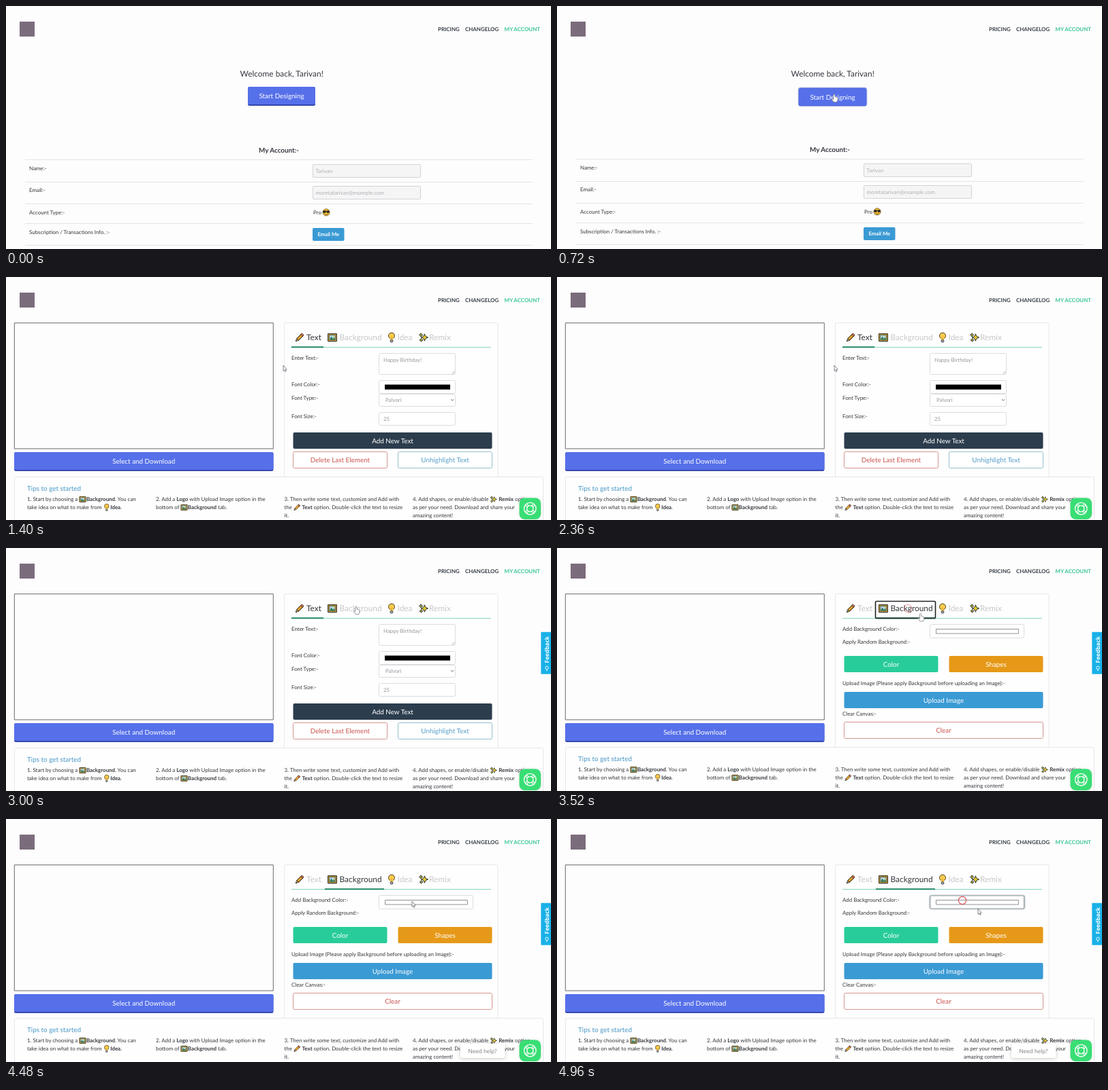
Write an HTML page with a canvas that moves like this. It is 800 by 358 pixels and loops after 5 s.

```html
<!DOCTYPE html>
<html lang="en">
<head>
<meta charset="utf-8">
<title>Design tool walkthrough</title>
<style>
html, body { margin: 0; width: 100%; height: 100%; overflow: hidden; background: #fefdfe; }
canvas { display: block; width: 800px; height: 358px; }
</style>
</head>
<body>
<canvas id="stage" width="800" height="358"></canvas>
<script>
const ctx = document.getElementById('stage').getContext('2d');
const LOOP = 5000, TAU = Math.PI * 2;
const PAGE_OPEN = 880, HELP_ICON = 1040, TAB_SWITCH = 3240, TAB_BLUR = 4240, HELP_TIP = 4200, COLOR_FOCUS = 4800;
const SMALL = 7.92, MEDIUM = 9.9, LARGE = 11.9;
const INK = '#34383d', FAINT = '#c8c8cb', MUTED = '#94999e', BLUE = '#3a9ad4';
const RED = '#c9534e', RED_EDGE = '#d39690';

// Fractional glyph advances keep small text at its true width.
ctx.textRendering = 'geometricPrecision';

const clamp = v => Math.max(0, Math.min(1, v));
const ease = v => { v = clamp(v); return v * v * (3 - 2 * v); };

function box(x, y, w, h, r, fill, stroke, line = 1) {
  ctx.beginPath();
  ctx.roundRect(x, y, w, h, r);
  if (fill) { ctx.fillStyle = fill; ctx.fill(); }
  if (stroke) { ctx.strokeStyle = stroke; ctx.lineWidth = line; ctx.stroke(); }
}

function text(str, x, y, size = SMALL, color = INK, align = 'left', weight = 400, family = 'Lato') {
  ctx.font = `${weight} ${size}px ${family}, sans-serif`;
  ctx.textAlign = align;
  ctx.fillStyle = color;
  ctx.fillText(str, x, y);
}

function shape(points, fill, stroke, line = 1) {
  ctx.beginPath();
  points.forEach(([x, y]) => ctx.lineTo(x, y));
  ctx.closePath();
  if (fill) { ctx.fillStyle = fill; ctx.fill(); }
  if (stroke) { ctx.strokeStyle = stroke; ctx.lineWidth = line; ctx.stroke(); }
}

function disc(x, y, r, fill, stroke, line = 1) {
  box(x - r, y - r, r * 2, r * 2, r, fill, stroke, line);
}

function rule(x1, y1, x2, y2, color, line = 1) {
  ctx.beginPath();
  ctx.moveTo(x1, y1);
  ctx.lineTo(x2, y2);
  ctx.strokeStyle = color;
  ctx.lineWidth = line;
  ctx.stroke();
}

function star(x, y, r) {
  const points = Array.from({ length: 8 }, (_, i) => {
    const d = i % 2 ? r * 0.42 : r, a = i * Math.PI / 4;
    return [x + d * Math.sin(a), y - d * Math.cos(a)];
  });
  shape(points, '#ecc52f', '#25352a', 1);
}

// Icons are drawn in a 14 unit square around the origin.
const icons = {
  pencil() {
    ctx.rotate(-Math.PI / 4);
    box(-4.5, -1.9, 11, 3.8, 0.8, '#f5aa2c', '#33291d', 1);
    box(4.2, -1.9, 2.8, 3.8, 1, '#dd7a62', '#33291d', 0.8);
    shape([[-4.5, -1.9], [-8.3, 0], [-4.5, 1.9]], '#f4d4a0', '#33291d', 0.9);
    shape([[-6.6, -0.8], [-8.5, 0], [-6.6, 0.8]], '#222');
  },
  picture() {
    box(-6.4, -5.4, 12.8, 11, 0.5, '#d9ad48', '#3d3826', 1.2);
    box(-4.4, -3.5, 8.8, 7.2, 0, '#a9d6e6', '#4e4a32', 0.8);
    shape([[-4.2, 3.5], [-1.6, -1.2], [1, 2], [2.7, 0], [4.2, 3.5]], '#39784c');
    disc(2.4, -1.7, 1.1, '#f2ce45');
  },
  bulb() {
    disc(0, -2.4, 4.5, '#fbcb4d', '#4b3a1b', 1);
    shape([[-2.6, 1], [-1.8, 4], [1.8, 4], [2.6, 1]], '#fbcb4d');
    box(-1.8, 3.6, 3.6, 3.4, 1, '#a5a8ad', '#3b3b3d', 0.9);
    rule(0, -1, 0, 3, '#c98e26', 0.8);
  },
  sparkles() {
    star(1.4, 0, 5.2);
    star(-3.9, -3.6, 2.7);
    star(-3.5, 3.9, 2.5);
  },
  cool() {
    disc(0, 0, 6.5, '#f7c437', '#5c4519', 0.9);
    box(-6, -3, 5.4, 4, 1.5, '#202024');
    box(0.6, -3, 5.4, 4, 1.5, '#202024');
    rule(-5, -2.6, 5, -2.6, '#202024', 1);
    ctx.beginPath();
    ctx.arc(0, 1.4, 3, 0.3, Math.PI - 0.3);
    ctx.strokeStyle = '#5c3a16';
    ctx.stroke();
  }
};

function icon(name, x, y, size) {
  ctx.save();
  ctx.translate(x, y);
  ctx.scale(size / 14, size / 14);
  icons[name]();
  ctx.restore();
}

// Inline markup: *bold* and {icon}.
function rich(line, x, y) {
  let weight = 400;
  for (const part of line.split(/(\*|\{\w+\})/)) {
    if (part === '*') weight = weight === 400 ? 700 : 400;
    else if (part[0] === '{') {
      icon(part.slice(1, -1), x + 5.2, y - 2.8, 10.2);
      x += 10.6;
    } else if (part) {
      text(part, x, y, SMALL, INK, 'left', weight);
      x += ctx.measureText(part).width;
    }
  }
}

function button(label, x, y, w, h, fill, size = MEDIUM) {
  box(x, y, w, h, 2, fill);
  text(label, x + w / 2, y + h / 2 + size * 0.36, size, '#fff', 'center');
}

function outlineButton(label, x, y, w, h, color, border) {
  box(x + 0.5, y + 0.5, w - 1, h - 1, 2, '#fff', border);
  text(label, x + w / 2, y + h / 2 + 3.6, MEDIUM, color, 'center');
}

function raisedButton(label, x, y, w, h) {
  box(x, y, w, h, 2.5, '#3548ae');
  box(x, y, w, h - 2, 2.5, '#5670ea');
  text(label, x + w / 2, y + h / 2 + 3, MEDIUM, '#fff', 'center');
}

function field(x, y, w, h, value, fill = '#fff') {
  box(x + 0.5, y + 0.5, w - 1, h - 1, 2, fill, '#dcdcdf');
  if (value) text(value, x + 7, y + 13, SMALL, MUTED);
}

function header() {
  box(20, 23, 22, 22, 0, '#7b6c7c');
  text('PRICING', 634, 36.8, SMALL, '#343d45', 'left', 700);
  text('CHANGELOG', 674, 36.8, SMALL, '#343d45', 'left', 700);
  text('MY ACCOUNT', 784, 36.8, SMALL, '#36c596', 'right', 700);
}

function accountPage(pressed) {
  text('Welcome back, Tarivan!', 404.7, 104, LARGE, INK, 'center');
  if (pressed) {
    box(353.5, 119.5, 102, 28.5, 3.5, '#c6cdf0');
    box(355, 121, 99, 26, 2.5, '#5670ea', '#4a5fd0', 0.8);
    text('Start Designing', 404.5, 137.5, MEDIUM, '#fff', 'center');
  } else raisedButton('Start Designing', 355, 119, 99, 28);

  const up = pressed ? 1 : 0;
  ctx.save();
  ctx.translate(0, -up);
  text('My Account:-', 400.5, 215.5 + up * 0.5, MEDIUM, INK, 'center', 700);
  for (const y of [226, 259, 291, 320, 352]) rule(28, y + 0.5, 773, y + 0.5, '#e3e3e6');
  text('Name:-', 34, 241.5);
  text('Email:-', 34, 274.2);
  text('Account Type:-', 34, 306.5);
  text('Subscription / Transactions Info. :-', 34, 335.5);
  [['Tarivan', 233], ['moretatarivan@example.com', 265]].forEach(([value, y]) => {
    box(450.5, y + 0.5, 158, 19, 1.5, '#f6f5f6', '#d3d3d6');
    text(value, 454.5, y + 12.7, SMALL, '#b0b1b7');
  });
  text('Pro', 451, 306.5);
  icon('cool', 470, 304, 11);
  box(450, 327, 46.5, 19, 2, BLUE);
  text('Email Me', 473.3, 339.2, 7.7, '#fff', 'center', 700);
  ctx.restore();
}

function tabs(second, focused) {
  rule(419, 103.7, 712, 103.7, '#80cfb7');
  icon('pencil', 431, 89, 13.5);
  icon('picture', 479, 89, 14);
  icon('bulb', 566, 89, 14);
  icon('sparkles', 613, 89, 14);
  text('Text', 441, 93.2, LARGE, second ? FAINT : INK);
  text('Background', 489.5, 93.2, LARGE, second ? INK : FAINT);
  text('Idea', 574.5, 93.2, LARGE, FAINT);
  text('Remix', 621, 93.2, LARGE, FAINT);
  const [x, w] = second ? [468, 87] : [419, 47];
  box(x, 102.3, w, 1.9, 0, '#26886b');
  if (focused) box(467.5, 78.5, 88, 25, 1.5, null, '#202326', 1.6);
}

function textPanel() {
  text('Enter Text:-', 419, 121.5);
  field(547, 112, 113, 32, 'Happy Birthday!');
  rule(654.5, 142.5, 658.5, 138.5, '#99999c', 0.7);
  rule(656.5, 142.5, 658.5, 140.5, '#99999c', 0.7);
  text('Font Color:-', 419, 161);
  field(547, 152, 113, 20);
  box(556, 158.5, 96, 7.2, 0, '#000');
  text('Font Type:-', 419, 180.5);
  field(547, 172, 113, 19);
  text('Palvori', 557, 184.3, SMALL, MUTED);
  ctx.beginPath();
  ctx.moveTo(653, 180);
  ctx.lineTo(655.2, 182.3);
  ctx.lineTo(657.4, 180);
  ctx.strokeStyle = '#77787b';
  ctx.lineWidth = 1;
  ctx.stroke();
  text('Font Size:-', 419, 208);
  field(547, 199, 113, 20, '25');
  button('Add New Text', 421.5, 229, 292, 24, '#2c3d4e');
  outlineButton('Delete Last Element', 421, 257, 139, 25, RED, RED_EDGE);
  outlineButton('Unhighlight Text', 575, 257, 139, 25, '#559dc8', '#92c0cd');
}

function backgroundPanel(focused) {
  text('Add Background Color:-', 419, 121.5);
  if (focused) box(547.5, 113, 138.5, 19, 2.5, null, '#c3cace', 3.2);
  field(547, 112, 139, 21);
  if (focused) box(548, 113, 137.5, 19, 2, null, '#8f9ba2', 1);
  box(556.5, 119.5, 121, 6.5, 0, '#fff', '#929296');
  text('Apply Random Background:-', 419, 141);
  button('Color', 421.5, 159, 138, 24, '#28cc9a');
  button('Shapes', 575.5, 159, 138, 24, '#e69918');
  text('Upload Image (Please apply Background before uploading an Image):-', 419, 202);
  button('Upload Image', 421.5, 212, 292, 24, BLUE);
  text('Clear Canvas:-', 419, 246.5);
  outlineButton('Clear', 421, 256, 293, 25, RED, RED_EDGE);
}

const tips = [
  [31, '1. Start by choosing a {picture}*Background*. You can', 'take idea on what to make from {bulb}*Idea*.'],
  [220, '2. Add a *Logo* with Upload Image option in the', 'bottom of {picture}*Background* tab.'],
  [408.5, '3. Then write some text, customize and Add with', 'the {pencil} *Text* option. Double-click the text to resize', 'it.'],
  [597, '4. Add shapes, or enable/disable {sparkles} *Remix* option', 'as per your need. Download and share your', 'amazing content!']
];

function helpWidget(t) {
  const grow = ease((t - HELP_ICON) / 160);
  if (!grow) return;
  ctx.save();
  ctx.translate(769.3, 341.2);
  ctx.scale(grow, grow);
  ctx.shadowColor = 'rgba(60,80,70,.15)';
  ctx.shadowBlur = 4;
  box(-15.8, -15.8, 31.6, 31.6, 8, '#38de74');
  ctx.shadowBlur = 0;
  disc(0, 0, 8.8, null, '#fff', 1.3);
  disc(0, 0, 4.6, null, '#fff', 1.3);
  for (let i = 0; i < 4; i++) {
    ctx.rotate(TAU / 4);
    rule(4, 2.2, 7.4, 5.6, '#fff', 1.2);
    rule(2.2, 4, 5.6, 7.4, '#fff', 1.2);
  }
  ctx.restore();

  ctx.save();
  ctx.globalAlpha = ease((t - HELP_TIP) / 160);
  ctx.shadowColor = 'rgba(40,40,50,.25)';
  ctx.shadowBlur = 5;
  ctx.shadowOffsetY = 1;
  box(667, 331, 65.5, 21, 2.5, '#fff');
  ctx.shadowColor = 'transparent';
  text('Need help?', 699.5, 344.8, 8.6, '#85878c', 'center');
  ctx.restore();
}

function feedbackTab(t) {
  const shown = ease((t - 2640) / 280);
  if (!shown) return;
  ctx.save();
  ctx.translate(800 - 14.7 * shown, 123.7);
  box(0, 0, 17, 62, 0, '#18b1e8');
  ctx.translate(11.8, 45.7);
  ctx.rotate(-Math.PI / 2);
  text('Feedback', 0, 0, 8.3, '#fff', 'left', 700, 'Open Sans');
  ctx.rotate(Math.PI / 2);
  disc(-3.2, 7, 2.2, null, '#fff', 0.9);
  rule(-4.2, 10.8, -2.2, 10.8, '#fff', 1.2);
  ctx.restore();
}

function designPage(t) {
  const second = t >= TAB_SWITCH;
  const up = second ? 1 : 0;
  box(12.3, 67.7, 380, 185.3, 0, '#fefdfe', '#68696d');
  raisedButton('Select and Download', 12, 258, 380.5, 28);
  box(408.5, 67.5, 313.5, 227 - up, 1.5, '#fefefe', '#e8e8ec');
  tabs(second, second && t < TAB_BLUR);
  if (second) backgroundPanel(t >= COLOR_FOCUS);
  else textPanel();

  ctx.save();
  ctx.translate(0, -up);
  box(12.5, 294.5, 776, 80, 2, '#fefefe', '#e6e6ea');
  text('Tips to get started', 31, 315.3, MEDIUM, '#4897c6');
  for (const [x, ...lines] of tips) lines.forEach((line, i) => rich(line, x, 330.3 + i * 11.9));
  ctx.restore();
  helpWidget(t);
  feedbackTab(t);
}

// Each move: start, end, from x, from y, to x, to y.
const moves = [
  [80, 280, 440, 175, 407, 130],
  [2380, 2800, 407, 130, 514, 86],
  [3100, 3200, 514, 86, 515, 89],
  [3280, 4054, 515, 89, 596, 121],
  [4810, 4960, 596, 121, 618, 132]
];
const clicks = [[240, 407, 133], [3200, 515, 89], [4800, 595, 120]];

function pointerAt(t) {
  const [start, end, x1, y1, x2, y2] = moves.findLast(m => t >= m[0]) || moves[0];
  const k = ease((t - start) / (end - start));
  return [x1 + (x2 - x1) * k, y1 + (y2 - y1) * k];
}

function pointer(x, y, hand) {
  ctx.save();
  ctx.translate(x, y);
  ctx.lineJoin = 'round';
  if (hand) {
    shape([[-1.2, 0.6], [0, 0], [1, 0.8], [1.2, 4], [3.8, 4.6], [5, 5.8], [4.8, 9],
      [3.8, 11.6], [-0.8, 11.6], [-3.6, 7.8], [-3.2, 6.6], [-1.2, 7.8]], '#fff', '#808187', 0.8);
  } else {
    shape([[0, 0], [0, 8.4], [1.8, 6.9], [2.9, 9.5], [4.1, 9], [3, 6.4], [5.2, 6.2]],
      '#f6f6f8', '#6d6e76', 0.8);
  }
  ctx.restore();
}

function draw(t) {
  ctx.fillStyle = '#fefdfe';
  ctx.fillRect(0, 0, 800, 358);
  const [x, y] = pointerAt(t);
  const design = t >= PAGE_OPEN;
  const onButton = !design && t >= 80 && y < 147 && x < 454;
  header();
  if (design) designPage(t);
  else accountPage(onButton);

  for (const [start, cx, cy] of clicks) {
    const left = 1 - (t - start) / 460;
    if (t < start || left <= 0) continue;
    ctx.globalAlpha = Math.min(1, left * 1.4);
    disc(cx, cy, 5.6, null, '#d8474c', 1.2);
    ctx.globalAlpha = 1;
  }
  if (t >= 80) pointer(x, y, onButton || (design && x > 468 && y < 104));
}

function tick() {
  draw(performance.now() % LOOP);
  requestAnimationFrame(tick);
}
tick();
</script>
</body>
</html>
```
